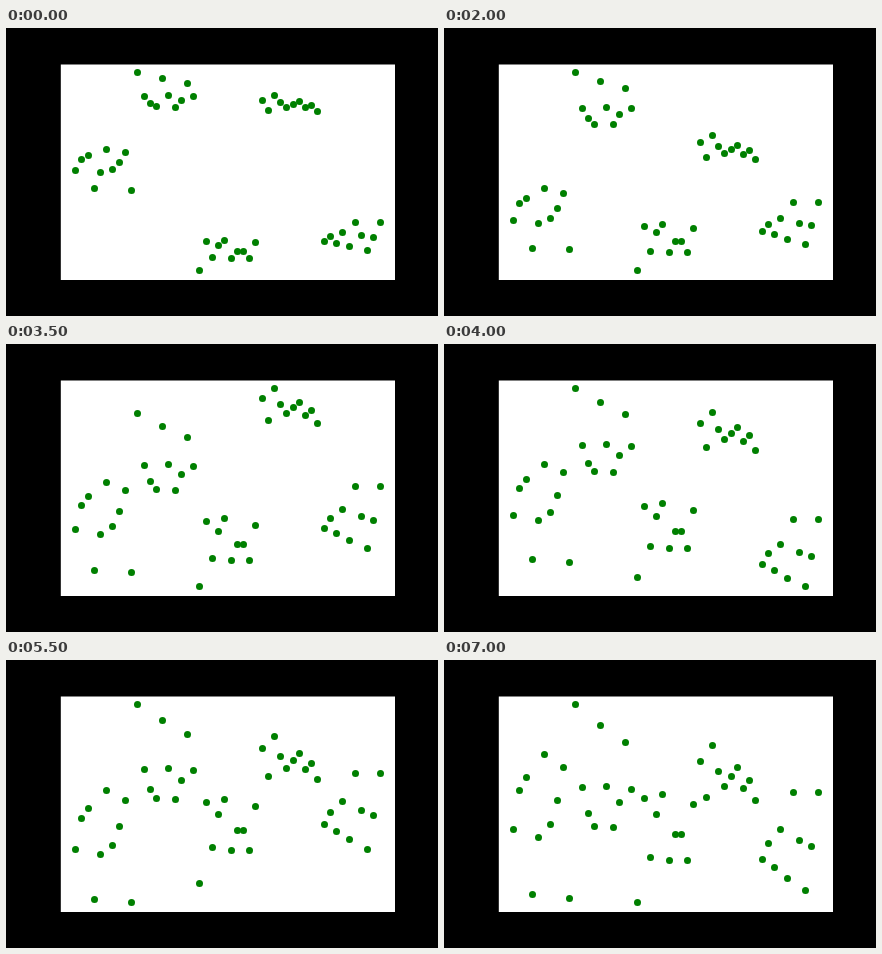
Animation of 432x288 px, one loop 7.5 s. Source, as an HTML page with a canvas:

```html
<!DOCTYPE html>
<html lang="en">
<head>
<meta charset="utf-8">
<title>Grouped scatter</title>
<style>
html, body { margin: 0; width: 100%; height: 100%; overflow: hidden; background: #000; }
canvas { display: block; }
</style>
</head>
<body>
<canvas id="stage" width="432" height="288"></canvas>
<script>
const ctx = document.getElementById('stage').getContext('2d');
const STEP = 500, POSES = 15;
const LEFT = 69.218, RIGHT = 373.582, TOP = 44, BOTTOM = 242;

// The plotted sample: offsets from each group's mean, in hundredths
const groups = [
  [10, -22, -33, 63, 16, -51, 6, -14, -41, 66],
  [-62, 6, 27, 37, -45, 5, 38, 18, -31, 7],
  [54, -31, 17, -18, -34, 20, -1, -1, 20, -26],
  [-13, 16, -26, -5, 7, -1, -8, 9, 2, 19],
  [12, -1, 19, -12, 28, -42, -3, 38, 2, -42]
];

// Gaps between neighbouring group means. The step sweeps back and forth over
// them; outer gaps shrink at a fixed rate, inner ones at a rate that settles.
function gapsAfter(steps) {
  const gaps = [-2.115, 4.56, -4.25, 3.82];
  let swing = -0.065;
  for (let k = 1; k <= steps; k++) {
    const i = 3 - Math.abs(3 - k % 6);
    if (i === 0 || i === 3) {
      gaps[i] *= 0.377;
    } else {
      gaps[i] *= 0.642 + swing;
      swing *= -0.76;
    }
  }
  return gaps;
}

// The vertical axis always fits the full range of the data
function layout(steps) {
  const gaps = gapsAfter(steps);
  let mean = 0;
  const values = groups.flatMap((group, g) => {
    if (g) mean += gaps[g - 1];
    return group.map(d => mean + d / 100);
  });
  const min = Math.min(...values), max = Math.max(...values);
  return values.map((v, i) => [
    Math.round(LEFT + (RIGHT - LEFT) * i / (values.length - 1)) + 0.5,
    Math.round(TOP + (BOTTOM - TOP) * (v - min) / (max - min)) + 0.5
  ]);
}

const poses = Array.from({ length: POSES }, (_, i) => layout(i));

function draw(pose) {
  ctx.fillStyle = '#000';
  ctx.fillRect(0, 0, 432, 288);
  ctx.fillStyle = '#fff';
  ctx.fillRect(54.8, 36.5, 334.2, 215.5);
  ctx.fillStyle = '#008000';
  for (const [x, y] of pose) {
    ctx.beginPath();
    ctx.arc(x, y, 3.5, 0, Math.PI * 2);
    ctx.fill();
  }
}

const start = performance.now();
function tick() {
  const elapsed = performance.now() - start;
  draw(poses[Math.floor(elapsed / STEP) % POSES]);
  requestAnimationFrame(tick);
}
tick();
</script>
</body>
</html>
```
